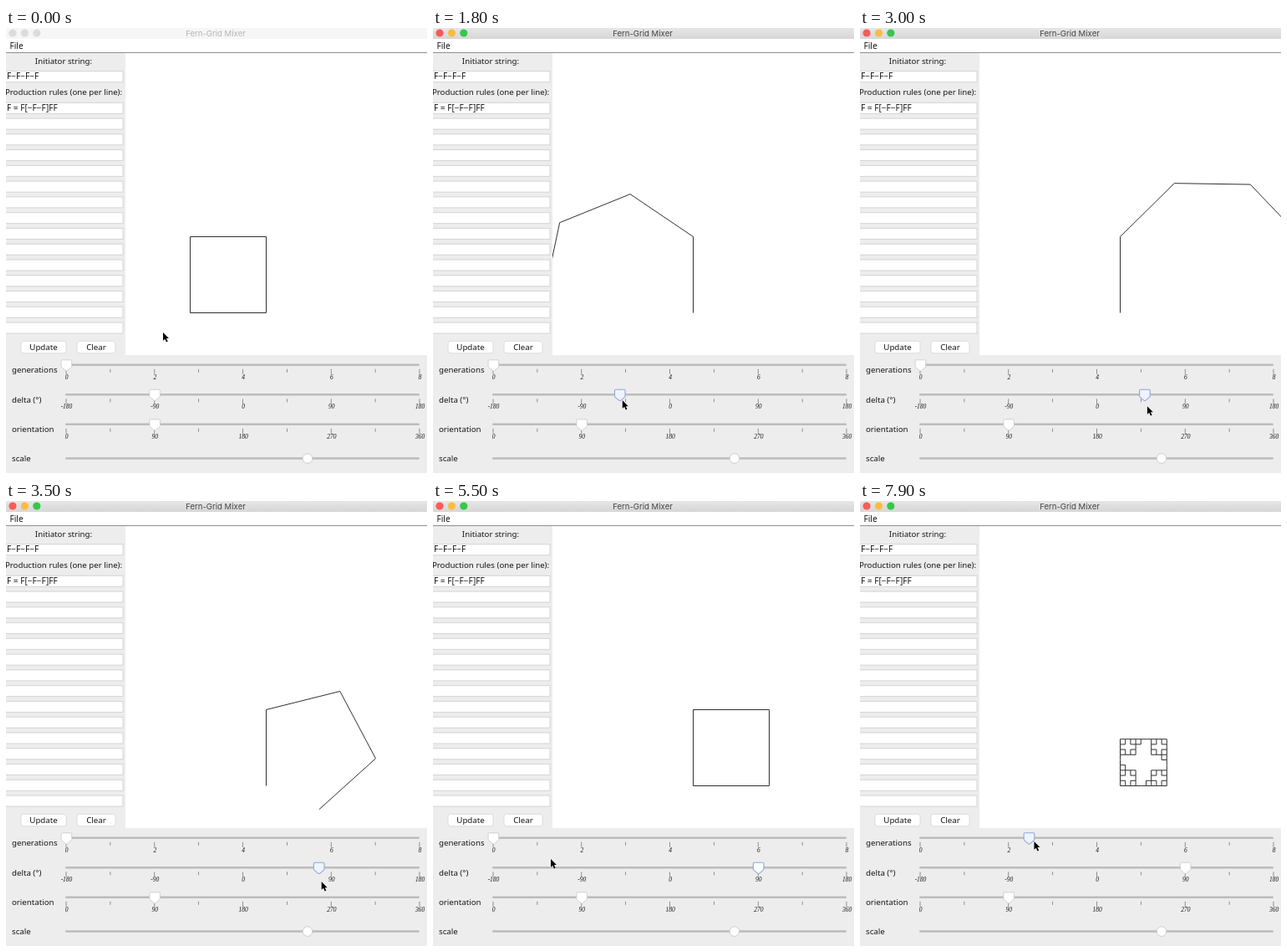
An HTML page for the animation above (8 s loop, 504x532 px).

```html
<!DOCTYPE html>
<html lang="en">
<head>
<meta charset="utf-8">
<title>Turtle graphics</title>
<style>
html, body { margin: 0; width: 100%; height: 100%; overflow: hidden; background: #ededed; }
svg { display: block; }
text { font: 9.7px "Noto Sans", "Open Sans", sans-serif; fill: #161616; white-space: pre; }
.title { font: 9.6px Inter, Roboto, sans-serif; }
.num { font: italic 7.5px "Liberation Serif", serif; }
.mid { text-anchor: middle; }
.code { font-size: 10.1px; }
</style>
</head>
<body>
<svg id="stage" width="504" height="532" viewBox="0 0 504 532">
  <defs>
    <clipPath id="view"><rect x="143" y="30" width="361" height="361"/></clipPath>
    <linearGradient id="bar" x2="0" y2="1">
      <stop stop-color="#e6e6e6"/><stop offset="1" stop-color="#d6d6d6"/>
    </linearGradient>
  </defs>
</svg>
<script>
const LOOP = 8000, FRAME = 100, LAG = 50;
const LEFT = 72, SPAN = 423;
const GEN_Y = 402.8, ROW = 35.5;
const stage = document.getElementById('stage');

function set(el, attrs) {
  for (const k in attrs) el.setAttribute(k, attrs[k]);
}
function add(tag, attrs, content = '') {
  const el = document.createElementNS('http://www.w3.org/2000/svg', tag);
  set(el, attrs);
  el.textContent = content;
  return stage.appendChild(el);
}
const rect = (x, y, width, height, fill, more) => add('rect', { x, y, width, height, fill, ...more });
const label = (x, y, str, cls = '') => add('text', { x, y, class: cls }, str);

// Title bar and menu
const bar = rect(0, 0, 504, 13);
const lights = [0, 1, 2].map(i => add('circle', { cx: 8 + i * 14.4, cy: 6, r: 4.6 }));
const title = label(251, 9.5, 'Fern-Grid Mixer', 'title mid');
rect(0, 13, 504, 16, '#fff');
rect(0, 29, 504, 1, '#8f8f8f');
label(4.5, 25, 'File', 'code');

// Left panel
label(69, 43, 'Initiator string:', 'mid');
label(69, 80, 'Production rules (one per line):', 'mid');
const field = y => rect(-0.5, y - 6.5, 140.5, 13, '#fff', { stroke: '#d4d4d4' });
field(58.2);
for (let i = 0; i < 15; i++) field(95.8 + i * 18.77);
label(1, 61.3, 'F−F−F−F', 'code');
label(1, 99, 'F = F[−F−F]FF', 'code');
for (const [x, w, str] of [[18, 54, 'Update'], [85, 46, 'Clear']]) {
  rect(x, 374.3, w, 14.5, '#fff', { rx: 3, stroke: '#d2d2d2', 'stroke-width': 0.7 });
  label(x + w / 2, 384.7, str, 'mid');
}

// Drawing area
rect(143, 30, 361, 361, '#fff');
const drawing = add('path', { fill: 'none', stroke: '#303030', 'clip-path': 'url(#view)' });

// Sliders
const rail = y => rect(LEFT - 1, y - 1.2, SPAN + 1, 2.4, '#bcbcbc', { rx: 1.2 });
function slider(row, name, first, step) {
  const y = GEN_Y + row * ROW;
  label(7, y + 9.5, name);
  rail(y);
  for (let i = 0; i < 9; i++) {
    const x = LEFT + i * SPAN / 8, major = i % 2 === 0;
    rect(x - 0.4, y + 5, 0.8, major ? 6 : 4, '#777');
    if (major) label(x + 0.5, y + 17, first + step * i / 2, 'num mid');
  }
  const thumb = add('path', {
    d: 'M-5 -6H5Q6.3 -6 6.3 -4.7V1.6Q6.3 2.4 5.6 3L0.8 7Q0 7.6 -0.8 7L-5.6 3Q-6.3 2.4 -6.3 1.6V-4.7Q-6.3 -6 -5 -6Z'
  });
  return (part, focus, pressed) => set(thumb, {
    transform: `translate(${thumbX(part)} ${y})`,
    fill: pressed ? '#eff3fc' : '#fff',
    stroke: focus ? '#8fa9d8' : '#c8c8c8',
    'stroke-width': focus ? 1.1 : 0.8
  });
}
const thumbX = part => LEFT + 0.4 + SPAN * part;
const setGen = slider(0, 'generations', 0, 2);
const setDelta = slider(1, 'delta (°)', -180, 90);
const setTurn = slider(2, 'orientation', 0, 90);
label(7, 518, 'scale');
rail(514.5);
add('circle', { cx: 361, cy: 514.6, r: 5.8, fill: '#fff', stroke: '#c4c4c4', 'stroke-width': 0.8 });

const cursor = add('path', {
  d: 'M0 0V9.8L2.3 7.7L4 11.4L5.7 10.7L4 7.1H7Z',
  stroke: '#fff', 'stroke-width': 0.8, 'paint-order': 'stroke'
});

// Motion
const mix = (a, b, p) => a + (b - a) * p;
const ramp = (t, from, to) => Math.min(1, Math.max(0, (t - from) / (to - from)));

const deltaStops = [[1100, -90], [1750, -56], [2550, 21], [3450, 76], [4000, 90]];
function deltaAt(t) {
  const i = Math.max(1, deltaStops.findIndex(s => s[0] > t)), last = deltaStops.length - 1;
  const [[t0, a], [t1, b]] = t >= 4000 ? deltaStops.slice(last - 1) : deltaStops.slice(i - 1, i + 1);
  return mix(a, b, ramp(t, t0, t1));
}
const genAt = t => 2.46 * ramp(t, 6480, 7900);
const deltaPart = t => (deltaAt(t) + 180) / 360;
const genPart = t => genAt(t) / 8;

// The pointer rides along with the held thumb and travels freely in between
function cursorAt(t) {
  const go = (x0, y0, x1, y1, p) => [mix(x0, x1, p), mix(y0, y1, p)];
  if (t < 1000) return go(188, 364, 181, 441, ramp(t, 0, 900));
  if (t < 4900) return [thumbX(deltaPart(t)) + 3, mix(441, 458, ramp(t, 1100, 4000))];
  if (t < 5500) return go(393, 458, 141, 428, ramp(t, 4900, 5500));
  if (t < 6300) return go(141, 428, 78, 399, ramp(t, 5500, 6000));
  return [thumbX(genPart(t)) + 6, mix(399, 407, ramp(t, 6480, 7900))];
}

function turtle(gen, delta) {
  let s = 'F-F-F-F', x = 311.5, y = 340.5, heading = 90, d = `M${x} ${y}`;
  for (let i = 0; i < gen; i++) s = s.replace(/F/g, 'F[-F-F]FF');
  const len = [91, 23.2, 6.2][gen], stack = [];
  for (const c of s) {
    if (c === 'F') {
      const a = heading * Math.PI / 180;
      x += len * Math.cos(a);
      y -= len * Math.sin(a);
      d += `L${x.toFixed(2)} ${y.toFixed(2)}`;
    } else if (c === '-') heading -= delta;
    else if (c === '[') stack.push([x, y, heading]);
    else {
      [x, y, heading] = stack.pop();
      d += `M${x} ${y}`;
    }
  }
  return d;
}

function render(t) {
  const active = t >= 1100, onGen = t >= 6300;
  set(bar, { fill: active ? 'url(#bar)' : '#f6f6f6' });
  title.style.fill = active ? '#444' : '#b4b4b4';
  lights.forEach((c, i) => set(c, { fill: active ? ['#fc5b57', '#fdbc40', '#34c84a'][i] : '#dcdcdc' }));

  setGen(genPart(t), onGen, onGen);
  setDelta(deltaPart(t), active && !onGen, active && t < 4700);
  setTurn(0.25, false, false);

  // The drawing trails the thumbs slightly
  set(drawing, { d: turtle(Math.round(genAt(t - LAG)), deltaAt(t - LAG)) });
  set(cursor, { transform: `translate(${cursorAt(t)})` });
}

const start = performance.now();
function tick() {
  const t = (performance.now() - start) % LOOP;
  render(Math.floor(t / FRAME) * FRAME);
  requestAnimationFrame(tick);
}
tick();
</script>
</body>
</html>
```
